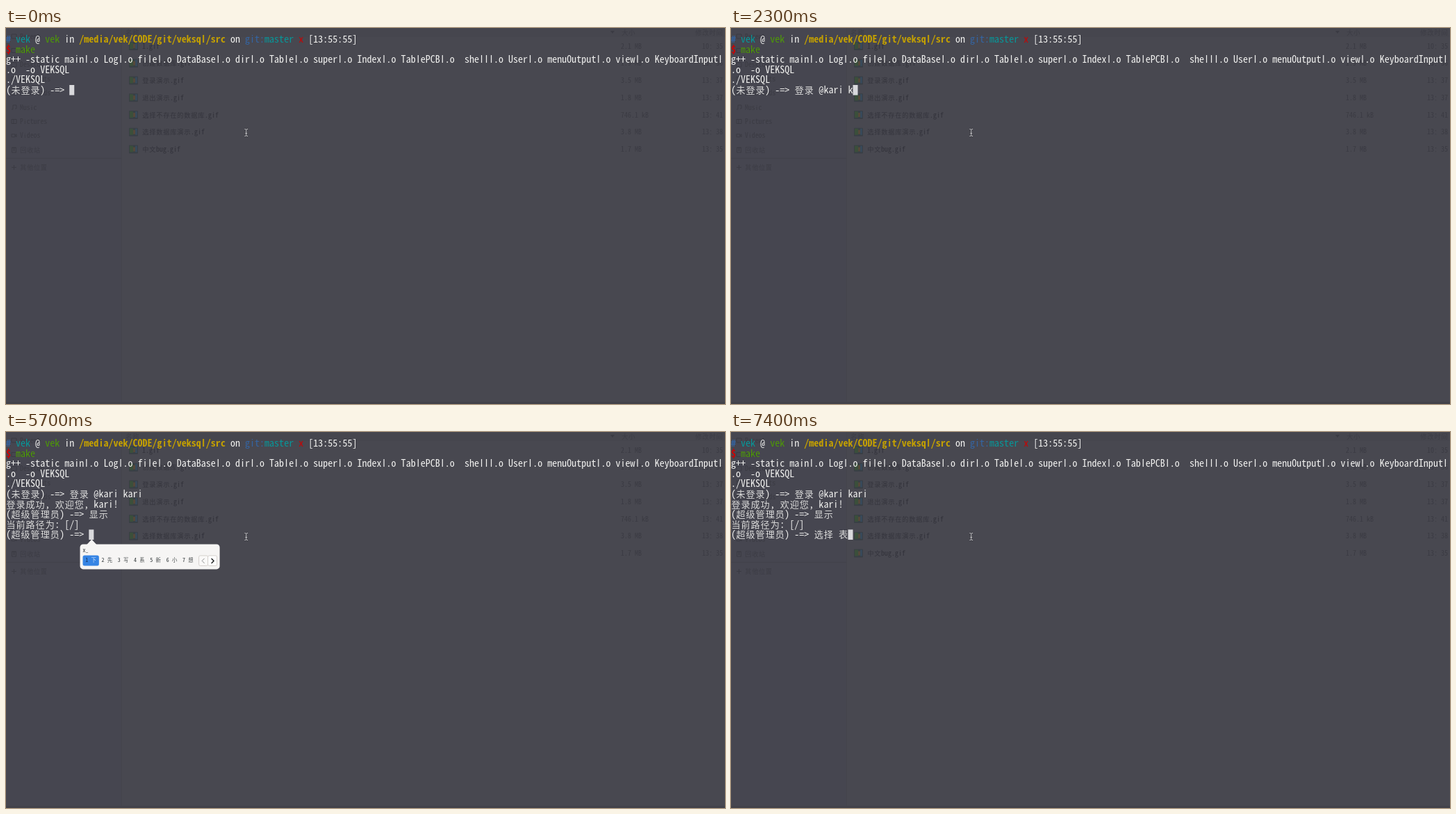
Write an HTML page that moves like this. It is 1035 by 541 pixels and loops after 8000 ms.

```html
<!DOCTYPE html>
<html lang="zh-CN">
<head>
<meta charset="utf-8">
<title>Terminal session</title>
<style>
  html, body { margin: 0; width: 100%; height: 100%; overflow: hidden; background: #484850; }
  svg { display: block; width: 100%; height: 100%; }
  text {
    font-family: "Noto Sans Mono CJK SC", "Noto Sans Mono CJK JP", "Noto Sans Mono", "Noto Sans CJK SC", "Noto Sans CJK JP", monospace;
    text-anchor: middle;
    white-space: pre;
  }
  .bar { font-family: "Liberation Sans", sans-serif; }
  .han { font-family: "Noto Sans CJK SC Light", "Noto Sans CJK SC", "Noto Sans CJK JP", sans-serif; font-weight: 300; font-size: .93em; fill-opacity: .86; }
  .bold { font-weight: 700; }
</style>
</head>
<body>
<svg id="stage" viewBox="0 0 1035 541">
  <g id="files"></g>
  <g id="shell"></g>
  <g id="live"></g>
  <g id="pointer"></g>
</svg>
<script>
const LOOP = 8000;
const CELL = 7.02, ROW = 14.6, TOP = 9;
const INK = '#f2f2f0', BLUE = '#3465a4', CYAN = '#06989a', GREEN = '#4e9a06', GOLD = '#c4a000', RED = '#cc0000';
const byId = id => document.getElementById(id);

const el = (tag, attrs, body = '') =>
  `<${tag} ${Object.entries(attrs).map(([k, v]) => `${k}="${v}"`).join(' ')}>${body}</${tag}>`;
const rect = (x, y, width, height, fill, more) => el('rect', { x, y, width, height, fill, ...more });
const path = (d, stroke, more) => el('path', { d, stroke, fill: 'none', ...more });

const wide = ch => ch.charCodeAt(0) > 0x2000 ? 2 : 1;
const cols = str => [...str].reduce((n, ch) => n + wide(ch), 0);
const escape = ch => ({ '<': '&lt;', '>': '&gt;', '&': '&amp;' }[ch] || ch);
const face = ch => wide(ch) > 1 ? 'han' : 'il'.includes(ch) ? 'bar' : '';

// Text on a character grid: Latin takes one cell, Chinese two.
function grid(str, x, y, fill, cell, cls = '') {
  let col = 0, spans = '';
  for (const ch of str) {
    const w = wide(ch);
    const at = (x + (col + w / 2) * cell).toFixed(2);
    if (ch !== ' ') spans += el('tspan', { x: at, class: face(ch) }, escape(ch));
    col += w;
  }
  return el('text', { y, fill, 'font-size': cell * 2, class: cls }, spans);
}

const rowTop = row => TOP + row * ROW;
const term = (str, row, col = 0, fill = INK, cls = '') =>
  grid(str, col * CELL, rowTop(row) + 12, fill, CELL, cls);

// Faint file manager behind the terminal
function drawFiles() {
  const dim = '#3b3b43', dark = '#32323a';
  let out = rect(0, 0, 1035, 541, '#484850') + rect(0, 0, 167, 541, '#464650') +
    rect(166, 0, 1, 541, '#44444c') + rect(0, 187, 166, 1, '#42424a') +
    rect(167, 0, 868, 13, '#46464e') + rect(0, 538, 1035, 3, '#42424a');
  const places = ['Recent', 'Home', 'Desktop', 'Documents', 'Downloads', 'Music', 'Pictures', 'Videos', '回收站'];
  const icons = {
    Music: 'M10 3V-3h5V2M10 3h-2M15 2h-2',
    Pictures: 'M8-3h7V3h-7zM11-3V3',
    Videos: 'M8-2h5V2h-5zM13 0l2-2V2z',
    '回收站': 'M8.500-3h6V4h-6zM8-3h7M10-1h3M10 1h3'
  };
  places.forEach((name, i) => {
    const y = 12 + i * 20.4;
    out += grid(name, 20, y + 3.5, dim, 4.9);
    out += path(icons[name] || 'M8-3h7V3h-7z', dim, { transform: `translate(0 ${y})` });
  });
  out += path('M8 200.500h7M11.500 197v7', dim) + grid('其他位置', 20, 204, dim, 4.9);
  out += grid('名称', 172, 9.5, dim, 5) + grid('大小', 886, 9.5, dim, 5) + grid('修改时间', 992, 9.5, dim, 5);
  out += el('path', { d: 'M870 4h6l-3 4z', fill: dim });
  const rows = [
    ['1.gif', '2.1 MB', '10：35'],
    ['创建数据库.gif', '1.9 MB', '13：36'],
    ['登录演示.gif', '3.5 MB', '13：37'],
    ['退出演示.gif', '1.8 MB', '13：37'],
    ['选择不存在的数据库.gif', '746.1 kB', '13：41'],
    ['选择数据库演示.gif', '3.8 MB', '13：38'],
    ['中文bug.gif', '1.7 MB', '13：35']
  ];
  rows.forEach(([name, size, time], i) => {
    const y = 26 + i * 24.75;
    out += rect(177, y - 6, 13, 12, '#393f45', { rx: 1 }) + rect(178, y - 5, 5, 9, '#3b4f3b') +
      rect(183, y - 3, 3, 6, '#55483a') + rect(186, y - 5, 3, 9, '#38495a');
    out += grid(name, 196, y + 3.5, dark, 5) + grid(size, 885, y + 3.5, dim, 5) + grid(time, 1002, y + 3.5, dim, 5);
  });
  return out;
}

// Fixed top rows of the shell
function drawShell() {
  const parts = [
    ['# ', BLUE, 'bold'], ['vek ', CYAN], ['@ ', INK], ['vek ', GREEN], ['in ', INK],
    ['/media/vek/CODE/git/veksql/src ', GOLD, 'bold'], ['on ', INK], ['git:', BLUE],
    ['master ', CYAN], ['x ', RED], ['[13:55:55]', INK]
  ];
  let col = 0, out = '';
  for (const [str, fill, cls] of parts) {
    out += term(str, 0, col, fill, cls);
    col += cols(str);
  }
  const objects = 'main Log file DataBase dir Table super Index TablePCB  shell User menuOutput view KeyboardInput'
    .replace(/\w+/g, '$&l.o').slice(0, -2);
  return out + term('$', 1, 0, RED, 'bold') + term('make', 1, 2, GREEN) +
    term('g++ -static ' + objects, 2) + term('.o  -o VEKSQL', 3) + term('./VEKSQL', 4);
}

function drawPointer() {
  const beam = 'M343.5 145.5h1.5l.8.8.8-.8h1.5M343.5 155.500h1.5l.8-.8.8.8h1.5M345.8 146v9M344.500 151.500h2.600';
  return path(beam, '#2c2c32', { 'stroke-width': 2.2, 'stroke-opacity': .6 }) + path(beam, '#d6d6d8', { 'stroke-width': .9 });
}

const GUEST = '(未登录) -=> ', ADMIN = '(超级管理员) -=> ';
const HISTORY = [GUEST + '登录 @kari kari', '登录成功, 欢迎您, kari!', ADMIN + '显示', '当前路径为: [/]'];

// start ms, finished rows, input, pinyin, candidates
const STEPS = [
  [0, 0, ''],
  [100, 0, '', 'd', '的 到 大 都 对 多 但'],
  [300, 0, '', 'de', '得 的 德 地 嘚 锝 底'],
  [500, 0, '', 'deng', '等 登 灯 邓 瞪 凳 蹬'],
  [600, 0, '', 'deng l', '登录 登陆 等来 等量 登临 瞪羚 瞪了'],
  [800, 0, '', 'deng lu', '登录 登陆 等路 等炉 灯路 等鹿 登庐'],
  [900, 0, '登录'],
  [1000, 0, '登录 '],
  [1500, 0, '登录 @'],
  [1700, 0, '登录 @k'],
  [1900, 0, '登录 @ka'],
  [2000, 0, '登录 @kar'],
  [2100, 0, '登录 @kari'],
  [2200, 0, '登录 @kari '],
  [2300, 0, '登录 @kari k'],
  [2900, 2, ''],
  [3500, 2, '', 'x', '下 先 写 系 新 小 想'],
  [3600, 2, '', 'xi', '系 西 洗 细 喜 戏 息'],
  [3700, 2, '', 'xia', '下 夏 吓 虾 瞎 侠 西安'],
  [3900, 2, '', 'xian', '先 现 线 县 显 限 西安'],
  [4000, 2, '', 'xian s', '显示 先是 现实 限时 线上 先生 献身'],
  [4200, 2, '显示'],
  [4300, 4, ''],
  [5700, 4, '', 'x', '下 先 写 系 新 小 想'],
  [6000, 4, '', 'xu', '需 许 续 序 虚 须 徐'],
  [6100, 4, '', 'xua', '选 宣 悬 旋 玄 炫 轩'],
  [6200, 4, '', 'xuan', '选 宣 悬 旋 玄 炫 轩'],
  [6300, 4, '', 'xuan z', '选择 选中 选自 旋转 选在 选走 宣战'],
  [6600, 4, '', 'xuan ze', '选择 选则 悬着 旋着 选责 宣泽 玄泽'],
  [6700, 4, '选择'],
  [6800, 4, '选择 '],
  [6900, 4, '选择 ', 'b', '表 不 吧 并 把 包 被'],
  [7100, 4, '选择 ', 'bi', '比 必 笔 币 毕 闭 避'],
  [7200, 4, '选择 ', 'bia', '表 边 变 便 遍 标 编'],
  [7300, 4, '选择 ', 'biao', '表 标 彪 飙 镖 裱 表哦'],
  [7400, 4, '选择 表']
];

// Input method window, hung below the text cursor
function popup(cx, top, pinyin, words) {
  const x = cx - 12.8, y = top + 21, ink = '#2e3436', unit = 4;
  let left = x + 4, items = '';
  words.split(' ').forEach((word, i) => {
    const width = (2 + cols(word)) * unit + 7.3;
    if (!i) items += rect(left, y + 16, width, 15, '#3584e4', { rx: 2.5 });
    items += grid(String(i + 1), left + 3.6, y + 26, i ? ink : '#14305a', unit);
    items += grid(word, left + 3.6 + 2 * unit, y + 26, i ? ink : '#eaf2fc', unit);
    left += width;
  });
  const nav = left + 4, mid = y + 24;
  const frame = { stroke: '#d5d1cd', 'stroke-width': 1, rx: 2 };
  const body = rect(x, y, nav + 30 - x, 36, '#f6f5f4', { rx: 4.5 }) +
    el('path', { d: `M${cx + 4} ${top + 14}l7 7.500h-14z`, fill: '#f6f5f4' });
  return body + grid(pinyin + '_', x + 4, y + 12, ink, unit) + items +
    rect(nav, y + 16.5, 13, 14.5, '#faf9f8', frame) + rect(nav + 13, y + 16.5, 13, 14.5, '#ffffff', frame) +
    path(`M${nav + 8} ${mid - 3.5}l-3.500 3.500 3.500 3.500`, '#8b8e8f') +
    path(`M${nav + 18} ${mid - 3.5}l3.500 3.500-3.500 3.500`, '#1c1f20', { 'stroke-width': 1.4 });
}

function drawLive([, done, input, pinyin, words]) {
  const row = 5 + done, top = rowTop(row);
  const line = (done ? ADMIN : GUEST) + input;
  const cx = cols(line) * CELL;
  return HISTORY.slice(0, done).map((str, i) => term(str, 5 + i)).join('') + term(line, row) +
    rect(cx, top, CELL, ROW, '#d9d9dc') + (pinyin ? popup(cx, top, pinyin, words) : '');
}

byId('files').innerHTML = drawFiles();
byId('shell').innerHTML = drawShell();
byId('pointer').innerHTML = drawPointer();

const live = byId('live');
const start = performance.now();
let shown = null;

function render(ms) {
  const step = STEPS.findLast(s => s[0] <= ms);
  if (step === shown) return;
  shown = step;
  live.innerHTML = drawLive(step);
}

function tick() {
  render((performance.now() - start) % LOOP);
  requestAnimationFrame(tick);
}
tick();
</script>
</body>
</html>
```
